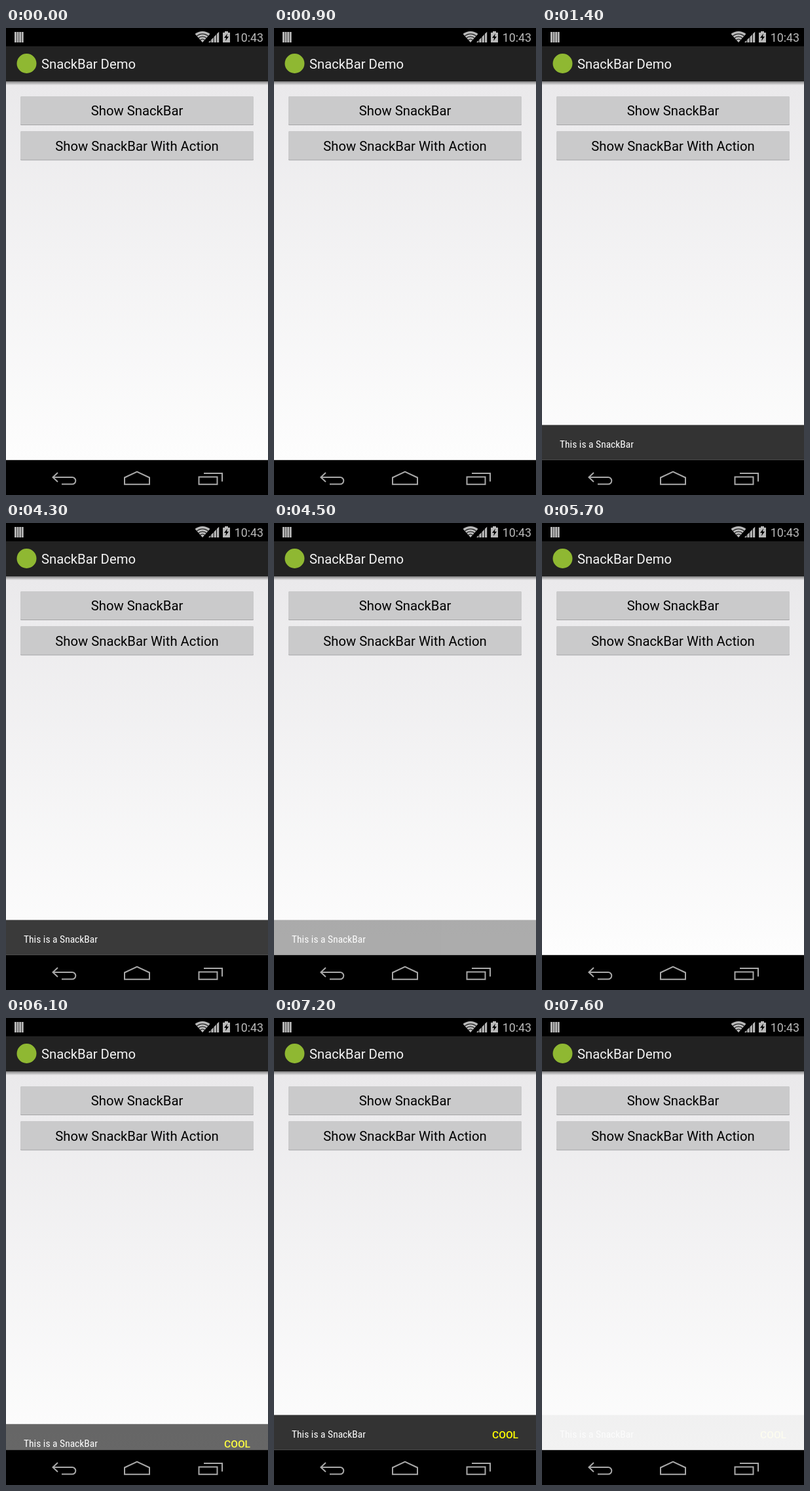
An HTML page for the animation above (7700 ms loop, 400x711 px).

```html
<!DOCTYPE html>
<html lang="en">
<head>
<meta charset="utf-8">
<title>SnackBar Demo</title>
<style>
  html, body { margin: 0; width: 100%; height: 100%; overflow: hidden; background: #000; }
  svg { display: block; width: 100%; height: 100%; }
  text { font-family: Roboto, sans-serif; font-size: 20.25px; }
  .button text { text-anchor: middle; }
  .status { fill: #b9b9b9; }
  .status text { font-size: 17.8px; text-anchor: end; }
  .nav { fill: none; stroke: #a8a8a8; stroke-width: 2; }
  .message { font-family: "Roboto Condensed", Roboto, sans-serif; font-stretch: 75%; font-size: 15.55px; fill: #fff; }
  .action { font-size: 15.55px; font-weight: 500; fill: #ff0; }
</style>
</head>
<body>
<svg viewBox="0 0 400 711">
  <defs>
    <linearGradient id="page" x2="0" y2="1">
      <stop stop-color="#eae9eb"/>
      <stop offset="1" stop-color="#fdfdfd"/>
    </linearGradient>
    <linearGradient id="shadow" x2="0" y2="1">
      <stop stop-opacity=".45"/>
      <stop offset="1" stop-opacity="0"/>
    </linearGradient>
    <clipPath id="fan"><path d="M300 22L288.5 9Q300 1 311.5 9Z"/></clipPath>
  </defs>

  <rect width="400" height="711"/>
  <rect y="81" width="400" height="577" fill="url(#page)"/>
  <rect y="27.8" width="400" height="53.3" fill="#222"/>
  <rect y="80" width="400" height="1.1" fill="#1a1a1a"/>
  <rect y="81.1" width="400" height="6" fill="url(#shadow)"/>
  <circle cx="31.5" cy="54" r="15" fill="#8fb832"/>
  <text x="54" y="62" fill="#f3f3f3">SnackBar Demo</text>

  <g class="status">
    <path d="M13 6h2.9v16H13zM16.600 6h2.900v16h-2.900zM20.200 6h2.900v16h-2.900zM23.800 6h2.900v16h-2.900z"/>
    <g clip-path="url(#fan)">
      <rect x="288" y="3" width="24" height="20"/>
      <g fill="none" stroke="#000" stroke-width="1.2">
        <circle cx="300" cy="22" r="5"/>
        <circle cx="300" cy="22" r="9"/>
        <circle cx="300" cy="22" r="13"/>
      </g>
    </g>
    <path d="M309 22l3.3-3.300V22zM313.300 22v-4.300l3.300-3.300V22zM317.600 22v-8.600l3.300-3.300V22zM321.900 22V9.100l3.300-3.300V22z"/>
    <path d="M334 5h5v2h3v15h-11V7h3z"/>
    <path d="M338 8.500l-5 6.500h3l-1 5 5-7h-3z" fill="#000"/>
    <text x="393" y="21">10:43</text>
  </g>

  <g class="button">
    <rect x="22" y="104.5" width="356" height="43.5" rx="1.5" fill="#a5a5a7"/>
    <rect class="face" x="22" y="104" width="356" height="43" rx="1.5"/>
    <text x="200" y="133">Show SnackBar</text>
  </g>
  <g class="button">
    <rect x="22" y="157.5" width="356" height="44" rx="1.5" fill="#a5a5a7"/>
    <rect class="face" x="22" y="157" width="356" height="43.5" rx="1.5"/>
    <text x="200" y="187">Show SnackBar With Action</text>
  </g>

  <g id="snackbar">
    <rect y="604.4" width="400" height="53.4" fill="#333"/>
    <text class="message" x="27" y="639">This is a SnackBar</text>
    <text class="action" id="action" x="333" y="640">COOL</text>
  </g>

  <rect y="657.8" width="400" height="53.2"/>
  <g class="nav">
    <path d="M79 677l-7.5 7 7.5 7M71.500 684H101a5.300 5.300 0 0 1 0 10.600H85"/>
    <path d="M181 684.500l19-9 19 9v10.300h-38z"/>
    <path d="M294.500 683.500h28v11.300h-28zM302 678h28v12.500"/>
  </g>
</svg>
<script>
  const LOOP = 7700, STEP = 100, BAR_HEIGHT = 53.4, ENTER = 300, EXIT = 450;
  const presses = [[100, 900], [4700, 5700]];
  const shows = [
    { enter: 1060, exit: 4246, action: false },
    { enter: 5902, exit: 7212, action: true }
  ];
  const faces = document.querySelectorAll(".face");
  const snackbar = document.getElementById("snackbar");
  const action = document.getElementById("action");

  // Accelerate-decelerate progress, limited to 0..1.
  function ease(elapsed, duration) {
    const p = Math.min(1, Math.max(0, elapsed / duration));
    return (1 - Math.cos(Math.PI * p)) / 2;
  }

  function draw(time) {
    faces.forEach((face, i) => {
      const [down, up] = presses[i];
      face.setAttribute("fill", time >= down && time < up ? "#b5b4b7" : "#cacacb");
    });
    const show = time < shows[1].enter ? shows[0] : shows[1];
    const entered = ease(time - show.enter, ENTER);
    const left = ease(time - show.exit, EXIT);
    snackbar.setAttribute("transform", `translate(0 ${BAR_HEIGHT * (1 - entered)})`);
    snackbar.setAttribute("opacity", entered * (1 - left));
    action.setAttribute("visibility", show.action ? "visible" : "hidden");
  }

  const start = performance.now();
  function tick() {
    const time = (performance.now() - start) % LOOP;
    draw(Math.floor(time / STEP) * STEP);
    requestAnimationFrame(tick);
  }
  tick();
</script>
</body>
</html>
```
